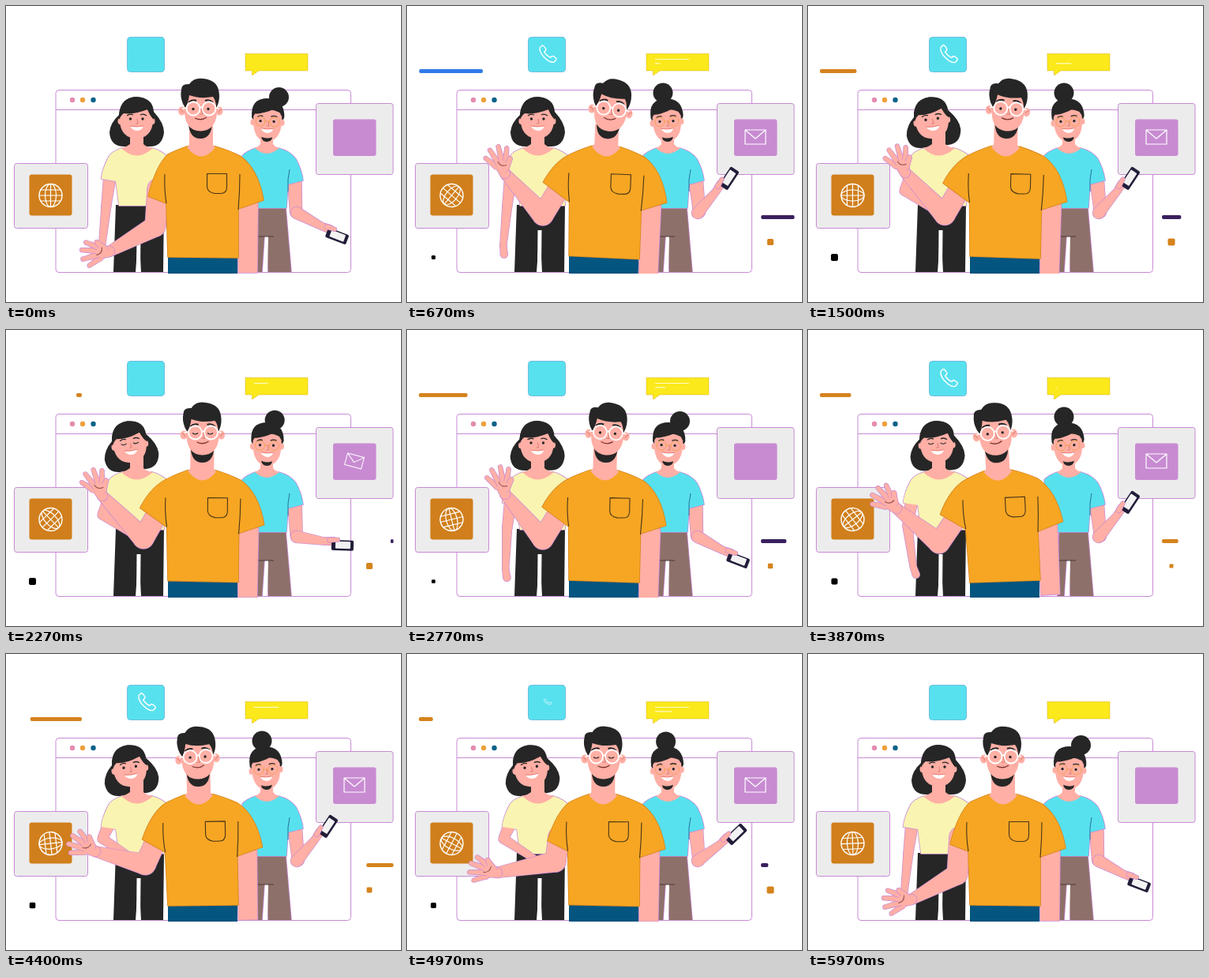
These frames come from a looping animation (500 px wide and 375 px high, 6.01 s). An HTML page with a canvas:

```html
<!DOCTYPE html>
<html lang="en">
<head>
<meta charset="utf-8">
<title>Team waving</title>
<style>
html,body{margin:0;width:100%;height:100%;overflow:hidden;background:#fff}
canvas{display:block;width:500px;height:375px}
</style>
</head>
<body>
<canvas id="stage" width="500" height="375"></canvas>
<script>
const c = document.getElementById('stage').getContext('2d');
const LOOP = 6010;
const SKIN = '#ffafa5', DARK = '#262626', EDGE = '#c98ad6', ORANGE = '#d5831d', RED = '#e2574c';
const rad = d => d * Math.PI / 180;
const mix = (a, b, p) => a + (b - a) * p;
const ease = p => (1 - Math.cos(Math.PI * Math.min(1, Math.max(0, p)))) / 2;
const span = (t, a, b) => ease((t - a) / (b - a));
const inside = (t, a, b) => t > a && t < b;

// rows: [time, ...values]
function keys(rows, t) {
  let i = 0;
  while (i < rows.length - 2 && t > rows[i + 1][0]) i++;
  const a = rows[i], b = rows[i + 1], p = span(t, a[0], b[0]);
  return a.slice(1).map((v, k) => mix(v, b[k + 1], p));
}

function shape(d, fill, edge) {
  const p = new Path2D(d);
  if (edge) { c.strokeStyle = edge; c.lineWidth = 1.6; c.stroke(p); }
  c.fillStyle = fill;
  c.fill(p);
}
function line(d, color, w = 1) {
  c.strokeStyle = color;
  c.lineWidth = w;
  c.stroke(new Path2D(d));
}
function dot(x, y, r, color, ry = r) {
  c.fillStyle = color;
  c.beginPath();
  c.ellipse(x, y, r, ry, 0, 0, 7);
  c.fill();
}
function ring(x, y, r, color, w, rx = r) {
  c.strokeStyle = color;
  c.lineWidth = w;
  c.beginPath();
  c.ellipse(x, y, rx, r, 0, 0, 7);
  c.stroke();
}
function box(x, y, w, h, r, fill, edge) {
  c.beginPath();
  c.roundRect(x, y, w, h, r);
  if (fill) { c.fillStyle = fill; c.fill(); }
  if (edge) { c.strokeStyle = edge; c.lineWidth = 1; c.stroke(); }
}
function group(draw, x, y, turn = 0, scale = 1) {
  c.save();
  c.translate(x, y);
  c.rotate(rad(turn));
  c.scale(scale, scale);
  draw();
  c.restore();
}
function around(x, y, turn, draw) {
  group(() => { c.translate(-x, -y); draw(); }, x, y, turn);
}

// tapered limb through [x, y, radius] joints
function limb(joints) {
  for (const [color, grow] of [[EDGE, .7], [SKIN, 0]]) {
    c.fillStyle = color;
    joints.forEach(([x, y, r], i) => {
      dot(x, y, r + grow, color);
      if (!i) return;
      const [px, py, pr] = joints[i - 1];
      const a = Math.atan2(y - py, x - px) + Math.PI / 2;
      const u = Math.cos(a), v = Math.sin(a), m = pr + grow, n = r + grow;
      c.beginPath();
      c.moveTo(px + u * m, py + v * m);
      c.lineTo(x + u * n, y + v * n);
      c.lineTo(x - u * n, y - v * n);
      c.lineTo(px - u * m, py - v * m);
      c.fill();
    });
  }
}

function eyes(x1, x2, y, closed) {
  for (const x of [x1, x2]) {
    if (closed) line(`M${x - 3.5} ${y}q3.5 3 7 0`, DARK, 1.1);
    else dot(x, y, 1.7, DARK);
  }
}

function scenery(t) {
  box(63, 106.5, 373.5, 231, 4, null, EDGE);
  line('M63 131.5H436', EDGE);
  [['#e58bb0', 84], ['#f0a03a', 97], ['#0a6288', 110.5]].forEach(([f, x]) => dot(x, 119, 3.2, f));

  box(153.5, 39.5, 47, 44, 4, '#57e1ee');
  c.setLineDash([1, 1]);
  box(153.5, 39.5, 47, 44, 4, null, '#3789c9');
  c.setLineDash([]);
  const tail = 'M303 60.5H382V82H320L311.5 88V82H303Z';
  shape(tail, '#fbe91b');
  c.setLineDash([1, 1]);
  line(tail, '#dfae12');
  c.setLineDash([]);

  const b = t % 2000;
  const w1 = 43 * (span(b, 0, 620) - span(b, 1000, 1500));
  const w2 = 21 * (span(b, 520, 950) - span(b, 1400, 1960));
  if (w1 > .5) line(`M314 67.5h${w1}`, '#fffbc8', 1.2);
  if (w2 > .5) line(`M314 72.8h${w2}`, '#fffbc8', 1.2);

  const s = t % 3000;
  const call = span(s, 0, 750) - span(s, 1470, 2350);
  if (call > .03) group(() => line('M-10 -8L-7 -11Q-5 -11-2 -6Q-2 -4-4.500-2.500Q-1 3 4 5Q5 3 7 3L11 6Q12 8 8 11Q3 12-4 5Q-11-2-10-8Z', '#fff', 1.4),
    178, 60.5, (1 - call) * -30, call);

  box(392.5, 123.5, 97.5, 90, 3, '#ececec', EDGE);
  box(414, 143.5, 54.5, 46.500, 3, '#c88bd2');
  const mail = span(s, 200, 600) - span(s, 2150, 2600);
  if (mail > .01) group(() => {
    line('M-13 -9H13V9H-13Z M-13 -9L0 2L13 -9', '#fff', 1.2);
  }, 441, 166, s > 1500 ? (1 - mail) * 90 : 0, mail);

  box(10.5, 199.5, 93, 82, 3, '#ececec', EDGE);
  box(29.5, 213.5, 54, 52, 3, '#d07f1c');
  group(() => {
    ring(0, 0, 14.5, '#fff', 1.4);
    ring(0, 0, 14.5, '#fff', 1.2, 7);
    line('M0 -14.500V14.500M-14.500 0H14.500M-12.500-7H12.500M-12.500 7H12.500', '#fff', 1.2);
  }, 56.5, 240, t / LOOP * 360);

  const q = t % 1200, turn = Math.floor(t / 1200);
  const grow = span(q, 0, 550), cut = span(q, 650, 1170);
  const bar = (x, y, w, color) => {
    if (grow - cut > .01) box(x + w * cut, y, w * (grow - cut), 5, 2, color);
  };
  bar(15, 80, 81, turn ? ORANGE : '#2f7be8');
  bar(448, 265, 42.5, turn === 3 ? ORANGE : '#3a215f');

  const [n] = keys([[0, 0], [670, 5], [1300, 9], [2270, 9], [3230, 1], [3870, 8], [4970, 7], [5400, 7], [5730, 4], [5970, 0], [LOOP, 0]], t);
  const [o] = keys([[0, 0], [670, 8], [1500, 9], [2270, 8], [3230, 5], [3870, 5], [4970, 9], [5500, 8], [5970, 0], [LOOP, 0]], t);
  box(33.5 - n / 2, 318.5 - n / 2, n, n, n * .25, '#000');
  box(460 - o / 2, 299 - o / 2, o, o, o * .2, ORANGE);
}

function leftWoman(t) {
  const s = t % 3000;
  const u = span(s, 640, 1380) - span(s, 2350, 2850);
  const closed = inside(s, 790, 990) || inside(s, 2180, 2380);
  const head = draw => group(() => around(165, 180, -7 * u, draw), -4 * u, 0);

  head(() => shape('M165 115Q186 116 187 134Q200 148 200 160Q198 178 182 178H150Q132 178 131 160Q132 148 143 138Q145 116 165 115Z', DARK));
  shape('M139 252H200L199 337H171L168 284L164 337H136Z', DARK);
  line('M168 284L167.500 337', '#fff', 5);

  const a = rad(mix(96, 33, u));
  const ex = mix(127, 122, u), ey = mix(252, 234, u);
  const hx = ex + 52 * Math.cos(a), hy = ey + 52 * Math.sin(a);
  const arm = () => limb([[132, 212, 8], [ex, ey, 6], [hx, hy, 4], [hx + 11 * Math.cos(a - .2), hy + 11 * Math.sin(a - .2), 4.5]]);
  const shirt = () => shape('M147 180Q134 184 130 191Q122 206 120.500 219L139 222L143 253H200L205 191Q196 183 185 180Z', '#f9f4b1', EDGE);
  if (u < .1) { arm(); shirt(); }
  else {
    shirt();
    arm();
    shape('M131 190Q122 206 120.500 219L140 222L147 195Z', '#f9f4b1');
  }
  shape('M157 158V175Q152 179 146 180Q165 199 186 180Q178 179 174 175V158Z', SKIN);

  head(() => {
    shape('M144 135V147Q146 167 165 168Q184 167 186 147V135Q165 122 144 135Z', SKIN);
    dot(144.500, 146, 3, SKIN, 4);
    dot(185.500, 146, 3, SKIN, 4);
    shape('M143 144Q142 116 165 115Q187 117 187 144Q182 139 179 131Q162 138 149 136Q146 138 143 144Z', DARK);
    line('M153 139q4-3 8-1M170 138q4-2 8 1', DARK, 1.3);
    eyes(157.500, 173, 143, closed);
    line('M166 143l1 6h-3', '#d9776e', .9);
    shape('M157 152Q165 154 174 152Q172 158 165.500 158Q159 157 157 152Z', '#fff');
    line('M157 152Q165 154 174 152', RED, .7);
  });
}

function rightWoman(t) {
  const s = t % 3000;
  const [a] = keys([[0, 30], [240, 30], [650, -47.7], [1770, -47.7], [2520, 30], [3000, 30]], s);
  const up = (30 - a) / 77.7;

  dot(mix(345.5, 324, up), mix(115.5, 110, up), 12.5, DARK);
  shape('M318 255H354L361 337H332L330 292H327L324 337H316Z', '#8e706a', EDGE);
  line('M330 292L329 337', '#fff', 4);
  line('M318 292h21', '#4b3836');

  limb([[365, 214, 9], [mix(367, 370, up), 261, 7.5]]);
  group(() => {
    limb([[0, 0, 7.500], [35, -1, 4.500], [47, -3, 5]]);
    group(() => {
      box(-14, -6.500, 28, 13, 2, '#211d39');
      box(-9, -5, 19, 9, 1, '#f2f2f2');
    }, 59, 0, -9);
    limb([[42, -4, 3], [52, -6, 2.300]]);
  }, 368, 262, a);

  shape('M316 180Q304 184 299 190L308 256H355L357 226L376 221Q374 207 367 194Q360 184 345 180Z', '#57e1ee', EDGE);
  line('M359 207Q356 219 357 235', '#28719b', 1);
  shape('M322 158V175Q319 179 315 180Q330 194 346 180Q341 179 338 175V158Z', SKIN);

  around(330, 170, mix(2.5, -2.5, up), () => {
    shape('M310 141Q307 118 329 117Q351 118 351 140L347 150H313Z', DARK);
    shape('M312 136V148Q314 171 330 172Q347 170 348 148V136Q330 126 312 136Z', SKIN);
    dot(311.5, 148, 3, SKIN, 4);
    dot(348.500, 147, 3, SKIN, 4);
    shape('M323 166Q330 169 337 166Q336 172 330 172Q324 172 323 166Z', DARK);
    shape('M310 143Q309 119 329 118Q350 119 350 142Q346 137 344 132Q335 130 332 133Q318 138 314 137Z', DARK);
    line('M317 141q4-3 7-1M334 140q4-2 8 0', DARK, 1.300);
    eyes(321, 338, 146, false);
    ring(321, 146.500, 6, '#f0a04a', .9);
    ring(339, 146.500, 6, '#f0a04a', .9);
    line('M327 146h6', '#f0a04a', .9);
    line('M331 146l1 6h-3', '#d9776e', .9);
    shape('M322 155Q330 157 338 155Q336 161 330 161Q324 160 322 155Z', '#fff');
    line('M322 155Q330 157 338 155', RED, .7);
  });
}

function hand(x, y, turn) {
  group(() => {
    limb([[0, 0, 6.5], [12, 0, 8]]);
    for (const [deg, len] of [[-30, 31], [-11, 35], [8, 35], [26, 32]]) {
      const k = rad(deg), u = Math.cos(k), v = Math.sin(k);
      limb([[14 * u, 14 * v, 3.5], [len * u, len * v, 2.4]]);
    }
    limb([[6, 4, 4], [15, 13, 2.7]]);
    dot(9, 0, 8, SKIN, 7);
    line('M9 6Q9 -2 17 -3', '#8b4a48', 1);
  }, x, y, turn);
}

// elbow, wrist, hand turn, lean, head tilt, sleeve lift
const WAVE = [
  [0, 189, 279, 131, 311, -185, 0, 0, 0],
  [670, 172, 265, 124, 212, -112, 2.1, 8, 1],
  [2270, 174, 264, 122, 210, -117, .5, 0, 1],
  [3230, 170, 266, 126, 206, -100, 2.1, 8, 1],
  [3870, 166, 270, 112, 226, -140, -2.7, -6, .75],
  [4970, 188, 263, 114, 277, -168, .5, 0, .25],
  [5650, 189, 279, 131, 311, -185, 0, 0, 0],
  [LOOP, 189, 279, 131, 311, -185, 0, 0, 0]
];

function man(t) {
  const [ex, ey, wx, wy, turn, lean, tilt, lift] = keys(WAVE, t);
  const closed = inside(t, 2150, 2400) || inside(t, 4850, 5100);

  limb([[192, 232, 13], [ex, ey, 13], [wx, wy, 6.5]]);
  hand(wx, wy, turn);
  box(205, 314, 88, 25, 0, '#04557f');

  around(249, 320, lean, () => {
    shape('M294 250H319L318 338H294Z', SKIN, EDGE);
    const ox = 180 - 11 * lift, oy = 241 - 15 * lift;
    shape(`M229 178Q215 183 205 188Q${190 - 7 * lift} ${202 - 4 * lift} ${ox} ${oy}L203 250L205 318L294 319V257L326 246Q319 206 296 190Q282 183 265 178Z`, '#f6a623', ORANGE);
    line('M201 213Q200 232 203 250M296 213Q296 235 294 258', '#4a3518', 1.1);
    line('M254.500 212.500H279.500V230Q279 237.500 272 237.500H264Q255 236 254.500 229Z', '#4a3518', 1.1);
    shape('M232 150V175Q231 178 229 179Q247 202 265 179Q262 178 262 175V150Z', SKIN);

    around(247, 165, tilt - lean, () => {
      group(() => manHead(closed), closed || lift > .2 ? 1.2 * Math.min(1, lift * 4) : 0, 0);
    });
  });
}

function manHead(closed) {
  shape('M231 148Q232 168 246 168Q260 168 261 148Z', DARK);
  dot(222.500, 133, 4.5, SKIN, 5.5);
  dot(270, 133, 4.5, SKIN, 5.500);
  line('M220 131q3 0 4 4M273 131q-3 0-4 4', '#d9776e', .9);
  shape('M226 110V136Q228 158 246 158.500Q265 158 267 136V110Z', SKIN);
  shape('M227 129L224 124Q220 114 222 106Q222 98 232 99Q238 90 250 92Q270 94 270 114Q270 123 266 129Q266 120 262 115Q245 118 232 113Q231 122 227 129Z', DARK);
  line('M231 122q5-4 10-2M252 120q5-2 10 2', DARK, 2);
  eyes(237, 256, 130.500, closed);
  ring(237, 130, 8.5, '#fff', 1.8);
  ring(257, 130, 8.5, '#fff', 1.8);
  line('M245.500 129q2-2 3 0M228.500 129L223 130M265.500 129L270 130', '#fff', 1.600);
  line('M247 130l2 7h-4', '#d9776e', 1);
  line('M239 142Q247 146 254 141', '#7c3330', 1.300);
}

function frame(now) {
  const t = now % LOOP;
  c.fillStyle = '#fff';
  c.fillRect(0, 0, 500, 375);
  c.lineCap = 'butt';
  c.lineJoin = 'round';
  scenery(t);
  c.save();
  c.beginPath();
  c.rect(0, 0, 500, 339);
  c.clip();
  leftWoman(t);
  rightWoman(t);
  man(t);
  c.restore();
}

const start = performance.now();
function tick() {
  frame(performance.now() - start);
  requestAnimationFrame(tick);
}
tick();
</script>
</body>
</html>
```
